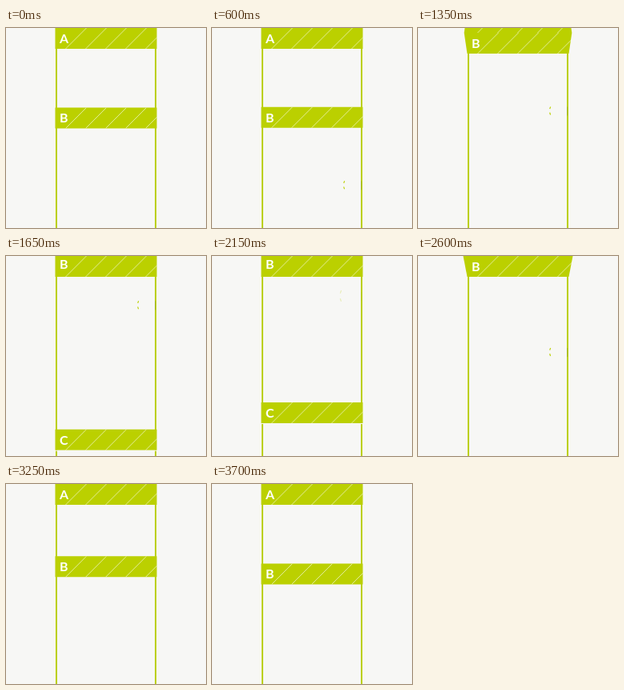
Animation, 250 px wide and 250 px high, one loop 3900 ms. Source, as an HTML page with a canvas:

```html
<!DOCTYPE html>
<html lang="en">
<head>
<meta charset="utf-8">
<title>Sticky headers</title>
<style>
  html, body { margin: 0; width: 100%; height: 100%; overflow: hidden; background: #f7f7f5; }
  canvas { display: block; width: 250px; height: 250px; }
</style>
</head>
<body>
<canvas id="stage" width="250" height="250"></canvas>
<script>
const ctx = document.getElementById('stage').getContext('2d');
const LOOP = 3900, STEP = 50;
const GREEN = '#bbd000', PAPER = '#f7f7f5';
const LEFT = 61.5, RIGHT = 188.5, BAR = 26, SECTION = 253;

// [time, position of the second header in the scrolled list]
const scroll = [[0, 99.5], [550, 99.5], [600, 98.8], [850, 74], [1100, 42.8], [1350, 6],
  [1650, -36.2], [1850, -60], [2150, -70], [2250, -66], [2600, 0], [2950, 58.8],
  [3150, 83], [3350, 95], [3600, 99.5], [3900, 99.5]];

const clamp = (v, lo = 0, hi = 1) => Math.min(hi, Math.max(lo, v));

// Monotone cubic interpolation through the points.
function curve(points, t) {
  let i = 0;
  while (i < points.length - 2 && t >= points[i + 1][0]) i++;
  const slope = k => {
    const a = points[k], b = points[k + 1];
    return a && b ? (b[1] - a[1]) / (b[0] - a[0]) : 0;
  };
  const tangent = k => {
    const m = slope(k - 1), n = slope(k);
    return m * n > 0 ? 2 * m * n / (m + n) : 0;
  };
  const [t0, y0] = points[i], [t1, y1] = points[i + 1];
  const h = t1 - t0, u = (t - t0) / h, v = 1 - u;
  return y0 * v * v * (1 + 2 * u) + y1 * u * u * (3 - 2 * u)
    + h * u * v * (tangent(i) * v - tangent(i + 1) * u);
}

// Header bar; its top and bottom edges can come towards the viewer.
function header(letter, y, wideTop = 0, wideBottom = 0, lift = 0) {
  ctx.save();
  ctx.beginPath();
  ctx.moveTo(LEFT - wideTop, y);
  ctx.lineTo(RIGHT + wideTop, y);
  ctx.lineTo(RIGHT + wideBottom, y + BAR);
  ctx.lineTo(LEFT - wideBottom, y + BAR);
  ctx.closePath();
  ctx.fillStyle = GREEN;
  ctx.fill();
  ctx.clip();

  ctx.strokeStyle = 'rgba(255,255,255,.75)';
  ctx.lineWidth = 0.8;
  ctx.beginPath();
  for (let x = 74.5; x < RIGHT; x += 25) {
    ctx.moveTo(x, y + BAR);
    ctx.lineTo(x + BAR, y);
  }
  ctx.stroke();

  ctx.fillStyle = '#fff';
  ctx.font = '700 16px Lato, "Open Sans", sans-serif';
  ctx.fillText(letter, 67, y + 18.8 - lift);
  ctx.restore();
}

function sides() {
  ctx.fillStyle = GREEN;
  ctx.fillRect(62, 0, 2, 250);
  ctx.fillRect(186, 0, 2, 250);
}

// Faint fragments of the touch ring.
function touch(y, r, alpha) {
  if (alpha <= 0) return;
  ctx.save();
  ctx.globalAlpha = alpha;
  ctx.strokeStyle = GREEN;
  ctx.lineWidth = 1.2;
  for (const [from, to] of [[2.7, 2.95], [3.35, 3.6]]) {
    ctx.beginPath();
    ctx.arc(176, y, r, from, to);
    ctx.stroke();
  }
  ctx.fillStyle = '#a2b52c';
  ctx.fillRect(186, y - 5, 1, 11);
  ctx.restore();
}

function drag(t, b, start, end, offset) {
  const fadeIn = clamp((t - start) / 200), fadeOut = clamp((t - end) / 150);
  touch(b + offset, 11.5 + 6 * (1 - fadeIn) + 6 * fadeOut, fadeIn * (1 - fadeOut));
}

function draw(t) {
  const b = curve(scroll, t);
  const top = Math.max(0, b);
  const flare = 5 * clamp(1 - Math.abs(b) / BAR);

  ctx.fillStyle = PAPER;
  ctx.fillRect(0, 0, 250, 250);
  sides();
  drag(t, b, 350, 1750, 97.5);
  drag(t, b, 2100, 2930, 120);

  if (b > 0) header('A', Math.min(0, b - BAR), 0, flare);
  header('B', top, flare, 0, 3 * clamp(-b / BAR));

  const c = b + SECTION;
  if (c < 250) {
    header('C', c);
    ctx.fillStyle = PAPER;
    ctx.fillRect(LEFT, c + BAR, RIGHT - LEFT, 1);
  }
}

const begin = performance.now();
function tick() {
  const t = (performance.now() - begin) % LOOP;
  draw(Math.floor(t / STEP) * STEP);
  requestAnimationFrame(tick);
}
tick();
</script>
</body>
</html>
```
